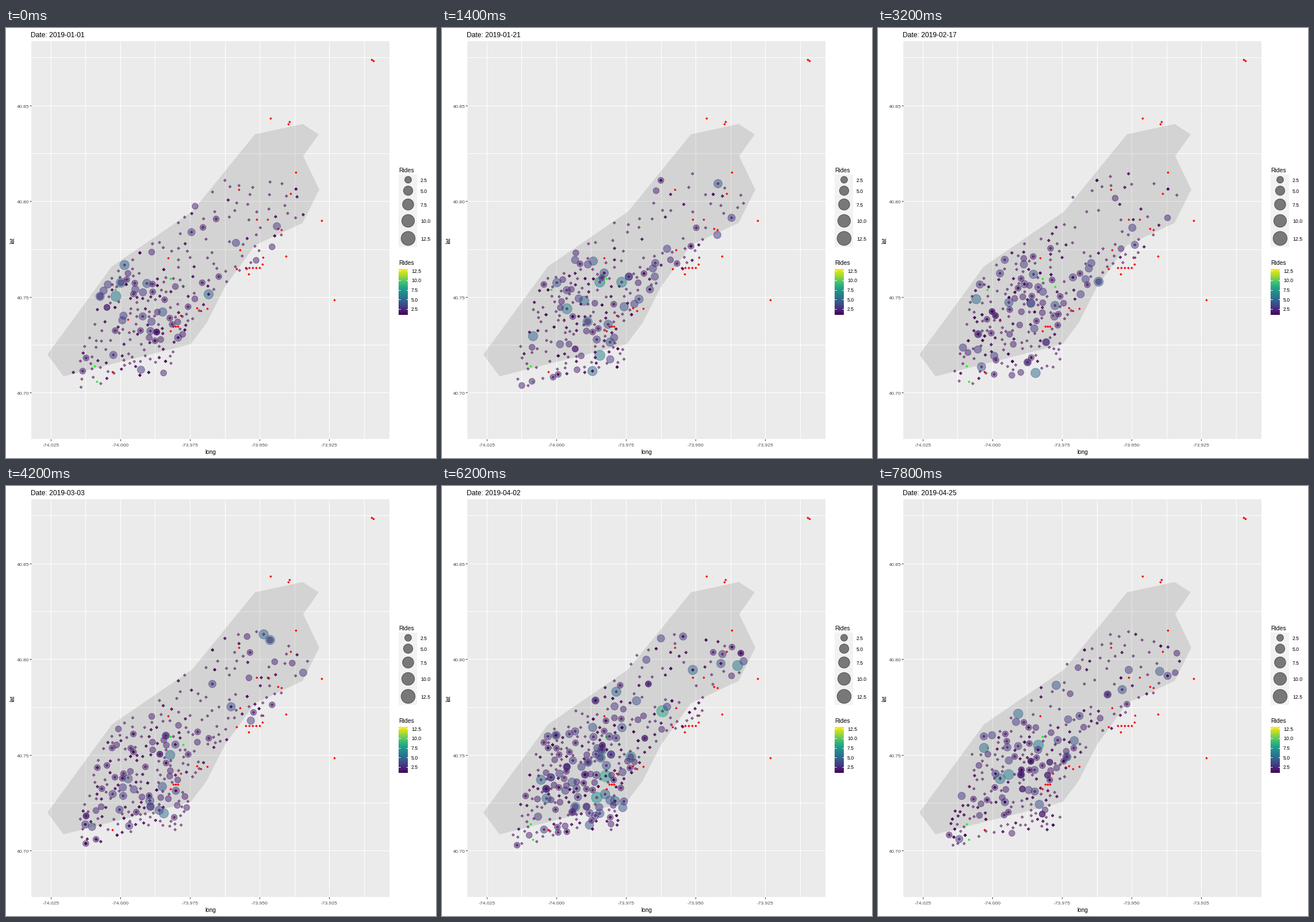
Recreate the animation shown at these times as a matplotlib script. Size 748x748 px, loop 8000 ms.

```python
import numpy as np
import matplotlib.pyplot as plt
from matplotlib.animation import FuncAnimation
from matplotlib.path import Path

SIZE = 748
FRAMES = 40
PT = 0.72  # points per pixel at 100 dpi
plt.rcParams["font.family"] = "Liberation Sans"

PANEL = (44, 23, 667.5, 715)
ZONE = [(72, 568), (184, 415), (324, 319), (433, 185), (516, 167), (544, 185),
        (517, 223), (545, 281), (516, 339), (433, 378), (381, 450), (349, 513),
        (321, 550), (100, 606)]

# Outline of the area with stations, and the park left empty inside it
SERVED = [(158, 470), (188, 426), (252, 373), (338, 292), (400, 249), (434, 250),
          (512, 281), (536, 310), (494, 342), (446, 400), (364, 456), (317, 518),
          (318, 575), (300, 597), (190, 610), (131, 630), (114, 600), (142, 541)]
PARK = [(318, 396), (338, 408), (428, 325), (405, 312)]
DOWNTOWN = (242, 488)

RED = [(636, 54), (639, 56), (460, 156), (493, 162), (491, 166), (504, 250),
       (405, 280), (495, 287), (436, 332), (455, 332), (549, 334), (473, 348),
       (479, 350), (407, 385), (282, 399), (487, 396), (447, 398), (446, 410),
       (401, 418), (422, 427), (571, 472), (332, 486), (339, 491), (350, 487),
       (304, 499), (212, 506), (286, 526), (185, 597)]
RED += [(417 + 6 * i, 416) for i in range(5)] + [(291 + 4 * i, 518) for i in range(3)]
GREEN = [(190, 454), (286, 435), (308, 449), (154, 587), (158, 614)]


def make_stations():
    """Random stations kept a minimum distance apart, denser in the south."""
    rng = np.random.default_rng(7)
    served, park = Path(SERVED), Path(PARK)
    spots = np.array([DOWNTOWN], float)
    for p in rng.uniform((110, 245), (540, 635), (12000, 2)):
        if not served.contains_point(p) or park.contains_point(p):
            continue
        gap = np.interp(p[1], (340, 440), (12.5, 8))
        if np.hypot(*(spots - p).T).min() > gap:
            spots = np.vstack([spots, p])
    return spots


STATIONS = make_stations()
HEAT = np.exp(-((STATIONS - DOWNTOWN) ** 2).sum(1) / (2 * 65 ** 2))


def rides_on(day):
    """Places and ride counts of one day's records, biggest first."""
    rng = np.random.default_rng(500 + day)
    level = 1 + 0.002 * day + 0.55 * np.exp(-((day - 83) / 14) ** 2)
    records = rng.poisson(level * (0.65 + 0.25 * HEAT))
    idx = np.repeat(np.arange(len(STATIONS)), records)
    busy = rng.random(len(idx)) < level * (0.11 + 0.17 * HEAT[idx])
    rides = 1 + busy * rng.geometric(0.72 - 0.12 * level, len(idx))
    rides = np.minimum(rides, 10)
    order = np.argsort(-rides, kind="stable")
    return STATIONS[idx[order]], rides[order]


def area(rides):
    diam = 4.7 + 20.2 * np.sqrt((np.asarray(rides) - 1) / 12)
    return (diam * PT) ** 2


def date_label(day):
    month = 1
    for length in (31, 28, 31, 30):
        if day < length:
            break
        day -= length
        month += 1
    return f"Date: 2019-{month:02d}-{day + 1:02d}"


fig = plt.figure(figsize=(7.48, 7.48), dpi=100, facecolor="white")
ax = fig.add_axes([0, 0, 1, 1])
ax.axis("off")


def text(x, y, s, size, color="black", ha="left"):
    return ax.text(x, y + 0.36 * size, s, size=size * PT, color=color,
                   ha=ha, va="baseline")


def line(xs, ys, color, z=1):
    ax.plot(xs, ys, color=color, lw=PT, zorder=z, solid_capstyle="butt")


def box(x0, y0, x1, y1, color):
    ax.add_patch(plt.Rectangle((x0, y0), x1 - x0, y1 - y0, fc=color, lw=0, zorder=0))


def draw_panel():
    left, top, right, bottom = PANEL
    box(*PANEL, "#EBEBEB")
    for k in range(10):
        x = int(78 + 60.6 * k)
        line([x, x], [top, bottom], "white")
        if k % 2 == 0:
            line([x, x], [bottom, bottom + 3], "#333333")
            text(x + 0.5, 724.5, f"{-74.025 + 0.0125 * k:.3f}", 8.5, "#4D4D4D", "center")
    for k in range(8):
        y = round(51.4 + 83.3 * k)
        line([left, right], [y, y], "white")
        if k % 2:
            line([left - 3, left], [y, y], "#333333")
            text(40, y + 0.5, f"{40.875 - 0.025 * k:.2f}", 8.5, "#4D4D4D", "right")
    ax.add_patch(plt.Polygon(ZONE, fc="black", alpha=0.1, lw=0, zorder=2))
    text(355.5, 737.5, "long", 10, ha="center")
    ax.text(11, 370, "lat", size=10 * PT, rotation=90, ha="center", va="center")
    for pts, color in ((RED, "red"), (GREEN, "lime")):
        ax.scatter(*np.array(pts).T + 0.5, s=(3.2 * PT) ** 2, marker="D",
                   c=color, lw=0, zorder=3)


def draw_legends():
    sizes = [2.5, 5, 7.5, 10, 12.5]
    rows = [264, 283, 307, 335.5, 366]
    text(683, 247, "Rides", 10.4)
    box(683, 255, 715, 381, "#F2F2F2")
    ax.scatter([699.5] * 5, rows, s=area(sizes), fc=(0, 0, 0, 0.5),
               ec=(0, 0, 0, 0.5), lw=PT, zorder=3)
    text(683, 408.5, "Rides", 10.4)
    ax.imshow(np.linspace(1, 0, 80)[:, None], extent=(683, 699, 499, 419),
              cmap="viridis", aspect="auto", zorder=2)
    for n, y in zip(sizes, rows):
        text(721, y + 0.5, f"{n:.1f}", 8.8)
        bar_y = 499 - (n - 1) * 80 / 12
        text(705, bar_y, f"{n:.1f}", 8.8)
        line([683, 686], [bar_y, bar_y], "white", 3)
        line([696, 699], [bar_y, bar_y], "white", 3)


draw_panel()
draw_legends()
title = text(43.5, 11.5, "", 12)
circles = ax.scatter([], [], lw=PT, zorder=4)
diamonds = ax.scatter([], [], marker="D", lw=PT, s=(3.3 * PT) ** 2, zorder=5)
ax.set_xlim(0, SIZE)
ax.set_ylim(SIZE, 0)


def paint(dots, places, rides):
    colors = plt.cm.viridis((rides - 1) / 12, alpha=0.5)
    dots.set_offsets(places + 0.5)
    dots.set_facecolors(colors)
    dots.set_edgecolors(colors)


def update(frame):
    day = int(0.2 + 2.93 * frame)
    places, rides = rides_on(day)
    big = rides > 1
    paint(circles, places[big], rides[big])
    circles.set_sizes(area(rides[big]))
    paint(diamonds, places[~big], rides[~big])
    title.set_text(date_label(day))
    return circles, diamonds, title


anim = FuncAnimation(fig, update, frames=FRAMES, init_func=lambda: update(0),
                     interval=200, repeat=True, repeat_delay=0, blit=False)
plt.show()
```
